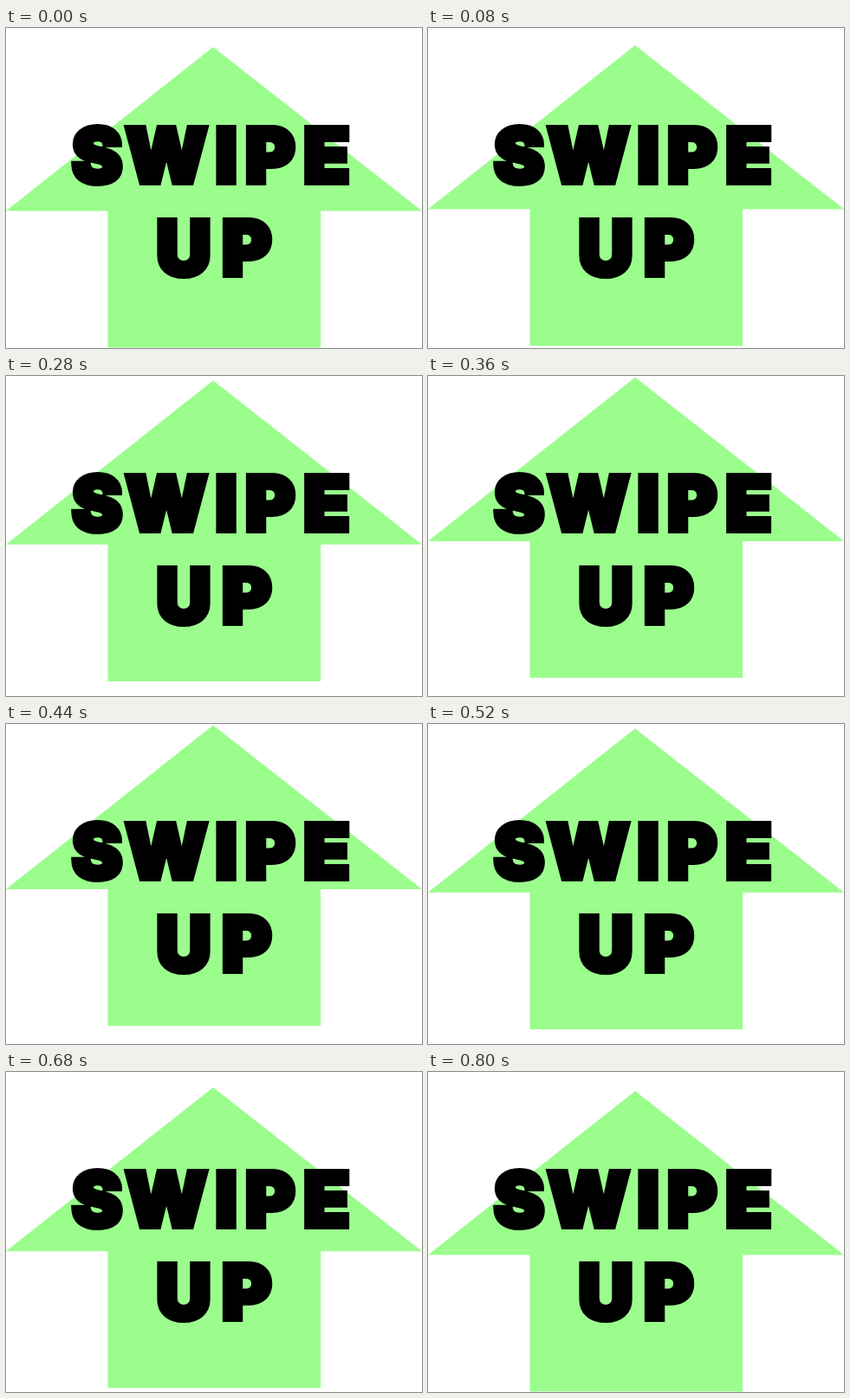
These frames come from a looping animation (480x370 px, 0.84 s). An HTML page:

```html
<!DOCTYPE html>
<html lang="en">
<head>
<meta charset="utf-8">
<title>Swipe up</title>
<style>
  html, body { margin: 0; width: 100%; height: 100%; overflow: hidden; background: #fff; }
  svg { display: block; width: 480px; height: 370px; }
  text {
    font: 900 88px Inter, "Open Sans", sans-serif;
    text-anchor: middle;
    stroke: #000;
    stroke-width: 6px; /* thickens the black weight */
  }
</style>
</head>
<body>
<svg viewBox="0 0 480 370">
  <path id="arrow" fill="#9afd8c" d="M239 22 480 211.5H363V369.6H117.5V211.5H0Z"/>
  <text x="105 185 254 304.5 370" y="179">SWIPE</text>
  <text x="205 277.5" y="285.5">UP</text>
</svg>
<script>
  const LOOP = 840, STEP = 40, SWING = 800, RISE = 21;
  const arrow = document.getElementById('arrow');

  function draw(now) {
    const t = Math.floor((now % LOOP) / STEP) * STEP;
    const y = -RISE * (1 - Math.cos(2 * Math.PI * t / SWING)) / 2;
    arrow.setAttribute('transform', `translate(0 ${y.toFixed(2)})`);
  }

  let start;
  function tick(now) {
    start ??= now;
    draw(now - start);
    requestAnimationFrame(tick);
  }
  draw(0);
  requestAnimationFrame(tick);
</script>
</body>
</html>
```
